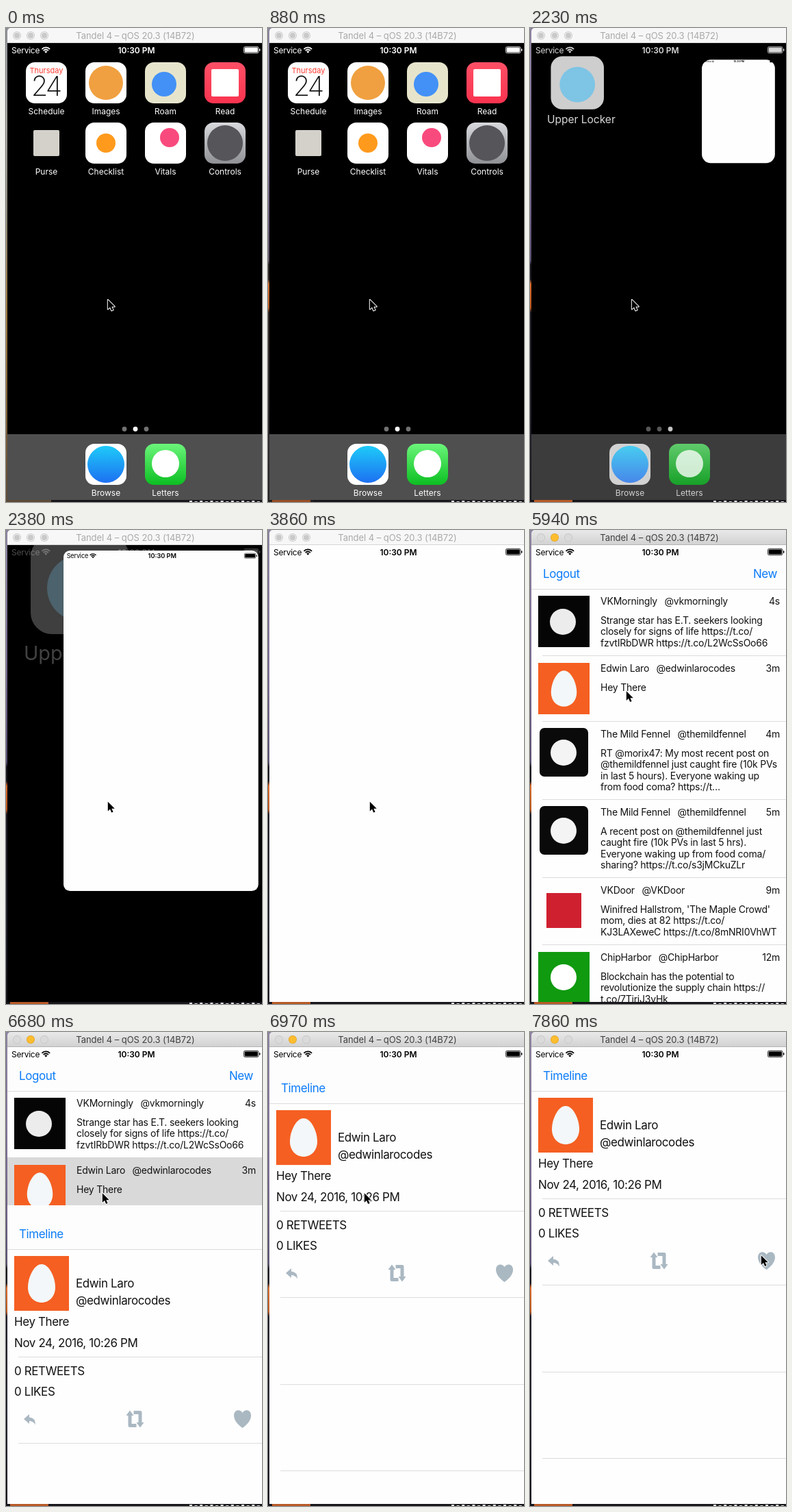
An HTML page with a canvas that plays this animation: 374 by 692 pixels, repeating every 8000 ms.

```html
<!DOCTYPE html>
<html lang="en">
<head>
<meta charset="utf-8">
<title>Phone simulator</title>
<style>
html, body { margin: 0; width: 374px; height: 692px; overflow: hidden; background: #000; }
canvas { display: block; }
</style>
</head>
<body>
<canvas id="stage" width="374" height="692"></canvas>
<script>
const ctx = document.getElementById('stage').getContext('2d');
const LOOP = 8000, STEP = 148.4;
const BLUE = '#0a7bf8', ICON = '#aab8c2', WHITE = '#fefefe';
const SCREEN = { x: 2, y: 22, w: 372, h: 667 };

const lerp = (a, b, p) => a + (b - a) * p;
const clamp = v => Math.max(0, Math.min(1, v));
const smooth = p => p * p * (3 - 2 * p);

function rect(x, y, w, h, color) {
  ctx.fillStyle = color;
  ctx.fillRect(x, y, w, h);
}

function round(x, y, w, h, r, color) {
  ctx.fillStyle = color;
  ctx.beginPath();
  ctx.roundRect(x, y, w, h, r);
  ctx.fill();
}

function dot(x, y, r, color) {
  ctx.fillStyle = color;
  ctx.beginPath();
  ctx.arc(x, y, r, 0, 7);
  ctx.fill();
}

function text(str, x, y, size, color, { align = 'left', weight = 400, gap = 0 } = {}) {
  ctx.font = `${weight} ${size}px Inter, "Open Sans", sans-serif`;
  ctx.letterSpacing = gap + 'px';
  ctx.textAlign = align;
  ctx.fillStyle = color;
  ctx.fillText(str, x, y);
  return ctx.measureText(str).width;
}

const big = (str, x, y, color = '#111', align) => text(str, x, y, 17, color, { gap: -0.4, align });
const small = (str, x, y, align) => text(str, x, y, 14, '#111', { gap: -0.22, align });

function fade(y0, y1, ...stops) {
  const g = ctx.createLinearGradient(0, y0, 0, y1);
  stops.forEach((s, i) => {
    const [at, color] = Array.isArray(s) ? s : [i / (stops.length - 1), s];
    g.addColorStop(at, color);
  });
  return g;
}

function clipScreen() {
  ctx.beginPath();
  ctx.rect(SCREEN.x, SCREEN.y, SCREEN.w, SCREEN.h);
  ctx.clip();
}

function fillScreen(color) {
  rect(SCREEN.x, SCREEN.y, SCREEN.w, SCREEN.h, color);
}

// Desktop visible beside and below the window
function desktop(p) {
  rect(0, 0, 374, 692, fade(0, 692, '#8c8f96', '#a5a49f', '#8d8878', '#a07a3c', '#806238', '#5c4a36'));
  ctx.globalAlpha = p;
  rect(0, 0, 374, 692, fade(0, 692, [0, '#8d83a0'], [0.3, '#77688f'], [0.49, '#584d6e'],
    [0.5, '#17161c'], [0.53, '#1a191f'], [0.54, '#d8692a'], [0.59, '#b8561f'], [0.6, '#1d1c26'], [0.8, '#20222e'], [1, '#14141a']));
  rect(6, 689, 56, 3, '#b75a26');
  ctx.globalAlpha = 1;
  rect(66, 689, 308, 3, '#17161b');
  for (let i = 0; i < 14; i++) rect(268 + i * 7.6, 690 + i % 2, 4, 2, '#ddd');
}

function titleBar(active) {
  ctx.fillStyle = active ? fade(0, 22, '#e9e9e9', '#d1d1d1') : '#f7f7f7';
  ctx.beginPath();
  ctx.roundRect(2, 0, 376, 22, [5, 0, 0, 0]);
  ctx.fill();
  rect(2, 21, 372, 1, active ? '#b4b4b4' : '#d6d6d6');
  [16, 36, 56].forEach((x, i) => {
    if (active) {
      dot(x, 11, 6, i === 1 ? '#dfa023' : '#c3c3c3');
      dot(x, 11, 5.3, i === 1 ? '#fdbd2f' : '#dadada');
    } else {
      dot(x, 11, 6, '#c4c4c4');
      dot(x, 11, 5.2, '#f0f0f0');
      dot(x, 11, 4, '#c9c9c9');
    }
  });
  text('Tandel 4 – qOS 20.3 (14B72)', 189, 16, 13, active ? '#3f3f3f' : '#a9a9a9', { align: 'center', gap: -0.05 });
}

function statusBar(x, y, k, color) {
  ctx.save();
  ctx.translate(x, y);
  ctx.scale(k, k);
  text('Service', 6, 14.5, 12, color, { gap: -0.25 });
  text('10:30 PM', 188.5, 14.5, 12, color, { align: 'center', weight: 600 });
  ctx.strokeStyle = color;
  ctx.lineWidth = 1.8;
  for (const r of [8, 4.9]) {
    ctx.beginPath();
    ctx.arc(56.3, 14.4, r, -Math.PI * 0.76, -Math.PI * 0.24);
    ctx.stroke();
  }
  ctx.fillStyle = color;
  ctx.beginPath();
  ctx.moveTo(56.3, 14.8);
  ctx.arc(56.3, 14.4, 2.8, -Math.PI * 0.76, -Math.PI * 0.24);
  ctx.fill();
  ctx.lineWidth = 0.8;
  ctx.beginPath();
  ctx.roundRect(345.4, 5.4, 21.6, 9.2, 2);
  ctx.stroke();
  round(346.6, 6.6, 19.2, 6.8, 1, color);
  round(368, 8.3, 1.4, 3.4, 0.7, color);
  ctx.restore();
}

function tile(x, y, color) {
  round(x, y, 60, 60, 13, color);
}

function label(str, x, y) {
  text(str, x, y, 12, '#fff', { align: 'center' });
}

// Each app: name, tile colour, then the plain mark: kind, dx, dy, half size, colour
function apps() {
  return [
    ['Schedule', '#fff'],
    ['Images', '#fff', 'c', 0, 0, 25, '#f0a040'],
    ['Roam', '#e6e5cc', 'c', -2, 2, 18, '#4391f6'],
    ['Read', fade(50, 110, '#ff4f66', '#f9334f'), 's', 0, 0, 20, '#fff'],
    ['Purse', null, 's', 0, 0, 19, '#d3d1ca'],
    ['Checklist', '#fff', 'c', 0, 0, 14, '#ff9a1c'],
    ['Vitals', '#fff', 'c', 6, -8, 14, '#f94a7d'],
    ['Controls', fade(138, 198, '#d8d9dc', '#8f9195'), 'c', 0, 0, 26, '#55555a'],
  ];
}

function mark(kind, x, y, r, color) {
  if (kind === 'c') dot(x, y, r, color);
  else round(x - r, y - r, 2 * r, 2 * r, 2, color);
}

function dock() {
  rect(2, 593, 372, 96, '#4f4f4f');
  tile(116, 607, '#fff');
  dot(146, 637, 27, fade(610, 664, '#1ecbf9', '#1d70f1'));
  tile(203, 607, fade(607, 667, '#6bf57a', '#0cbf22'));
  dot(233, 636, 20, '#fff');
  label('Browse', 146, 683);
  label('Letters', 233, 683);
}

function dots(active) {
  [173, 189, 205].forEach((x, i) => dot(x, 585.5, 3.4, i === active ? '#fff' : '#727272'));
}

function home() {
  fillScreen('#000');
  apps().forEach(([name, fill, kind, dx, dy, r, color], i) => {
    const x = 59 + (i % 4) * 87, y = 80 + (i >> 2) * 88;
    if (fill) tile(x - 30, y - 30, fill);
    if (kind) mark(kind, x + dx, y + dy, r, color);
    label(name, x, y + 46);
  });
  text('Thursday', 59, 66, 11, '#ff3b30', { align: 'center' });
  text('24', 58, 99, 40, '#111', { align: 'center', weight: 200, gap: -3 });
  dots(1);
  dock();
  statusBar(2, 22, 1, '#fff');
}

// The app window grows out of its icon while the home page zooms and darkens
function launch(p) {
  const q = p / 0.72, dim = Math.max(0, 1 - q * 0.74);
  const zoom = lerp(1, 2.4, q), k = lerp(60, SCREEN.w, p) / SCREEN.w;
  fillScreen('#000');
  ctx.save();
  clipScreen();
  ctx.globalAlpha = clamp(1 - q / 0.9);
  dots(2);
  dock();
  ctx.globalAlpha = dim;
  ctx.save();
  ctx.translate(lerp(59, 108, q), 80);
  ctx.scale(zoom, zoom);
  tile(-30, -30, '#f4f4f4');
  dot(0, 2, 20, '#6fc3ea');
  text('Upper Locker', -34.2, 46, 12, '#fff');
  ctx.restore();
  ctx.globalAlpha = Math.max(0.3, dim);
  statusBar(2, 22, 1, '#fff');
  ctx.globalAlpha = 1;
  const x = lerp(295, SCREEN.x, p), y = lerp(50.5, SCREEN.y, p);
  round(x, y, SCREEN.w * k, lerp(60, SCREEN.h, p), lerp(13, 0, p ** 4), WHITE);
  statusBar(x, y, k, '#000');
  ctx.restore();
}

function egg(x, y, size) {
  rect(x, y, size, size, '#f55f22');
  ctx.save();
  ctx.translate(x + size / 2, y + size / 2);
  ctx.scale(size / 80, size / 80);
  ctx.fillStyle = '#f3f7f9';
  ctx.beginPath();
  ctx.moveTo(0, -28);
  ctx.bezierCurveTo(11, -28, 20, -9, 20, 6);
  ctx.bezierCurveTo(20, 19, 11, 28, 0, 28);
  ctx.bezierCurveTo(-11, 28, -20, 19, -20, 6);
  ctx.bezierCurveTo(-20, -9, -11, -28, 0, -28);
  ctx.fill();
  ctx.restore();
}

function badge(y) {
  round(14, y - 1, 71, 71, 7, '#0a0a0a');
  dot(49, y + 35, 19, '#f4f4f4');
}

const posts = [
  { y: 87, name: 'VKMorningly', at: '@vkmorningly', age: '4s',
    body: ['Strange star has E.T. seekers looking', 'closely for signs of life https://t.co/', 'fzvtIRbDWR https://t.co/L2WcSsOo66'],
    face: y => { rect(12, y, 75, 75, '#050505'); dot(48, y + 38, 19, '#ececec'); } },
  { y: 185, name: 'Edwin Laro', at: '@edwinlarocodes', age: '3m', body: ['Hey There'],
    face: y => egg(12, y, 75) },
  { y: 281, name: 'The Mild Fennel', at: '@themildfennel', age: '4m',
    body: ['RT @morix47: My most recent post on', '@themildfennel just caught fire (10k PVs', 'in last 5 hours). Everyone waking up', 'from food coma? https://t…'],
    face: badge },
  { y: 395, name: 'The Mild Fennel', at: '@themildfennel', age: '5m',
    body: ['A recent post on @themildfennel just', 'caught fire (10k PVs in last 5 hrs).', 'Everyone waking up from food coma/', 'sharing? https://t.co/s3jMCkuZLr'],
    face: badge },
  { y: 509, name: 'VKDoor', at: '@VKDoor', age: '9m',
    body: ["Winifred Hallstrom, 'The Maple Crowd'", 'mom, dies at 82 https://t.co/', 'KJ3LAXeweC https://t.co/8mNRI0VhWT'],
    face: y => rect(24, y + 12, 51, 51, '#cf2030') },
  { y: 607, name: 'ChipHarbor', at: '@ChipHarbor', age: '12m',
    body: ['Blockchain has the potential to', 'revolutionize the supply chain https://', 't.co/7TiriJ3yHk'],
    face: y => { rect(12, y, 75, 75, '#0f9a0f'); dot(49, y + 37, 19, '#fff'); } },
];

const rule = (y, x = 18) => rect(x, y, 374 - x, 1, '#dcdcdc');

function navBar(left, right) {
  rect(2, 22, 372, 64, '#fdfdfd');
  rule(86, 2);
  big(left, 19, 70, BLUE);
  if (right) big(right, 361, 70, BLUE, 'right');
}

function feed(filled, picked) {
  fillScreen(WHITE);
  navBar('Logout', 'New');
  if (!filled) {
    for (let y = 130; y < 689; y += 44) rule(y);
    return;
  }
  posts.forEach(({ y, name, at, age, body, face }, i) => {
    if (i) rule(y - 2);
    if (picked && i === 1) rect(2, y - 2, 372, 96, '#d9d9d9');
    face(y + 9);
    const w = small(name, 103, y + 22);
    small(at, 103 + w + 10.5, y + 22);
    small(age, 365, y + 22, 'right');
    body.forEach((line, n) => small(line, 103, y + 49.5 + n * 16.6));
  });
}

function replyIcon() {
  ctx.fillStyle = ICON;
  ctx.beginPath();
  ctx.moveTo(26, 334);
  ctx.lineTo(34, 327);
  ctx.lineTo(34, 331.5);
  ctx.quadraticCurveTo(43, 332, 43, 342.5);
  ctx.quadraticCurveTo(40, 337, 34, 337);
  ctx.lineTo(34, 341);
  ctx.closePath();
  ctx.fill();
}

function repeatIcon() {
  ctx.fillStyle = ctx.strokeStyle = ICON;
  ctx.lineWidth = 5;
  ctx.lineJoin = 'round';
  for (const turn of [0, Math.PI]) {
    ctx.save();
    ctx.translate(188.5, 334);
    ctx.rotate(turn);
    ctx.fill(new Path2D('M-13 -5L-7.5 -12.5L-2 -5Z'));
    ctx.stroke(new Path2D('M-7.5 -6V9.5H2'));
    ctx.restore();
  }
}

function heartIcon() {
  ctx.fillStyle = ICON;
  ctx.beginPath();
  ctx.moveTo(345.5, 325);
  ctx.bezierCurveTo(348, 319.5, 358, 319.5, 358, 329);
  ctx.bezierCurveTo(358, 337, 350, 344, 345.5, 347);
  ctx.bezierCurveTo(341, 344, 333, 337, 333, 329);
  ctx.bezierCurveTo(333, 319.5, 343, 319.5, 345.5, 325);
  ctx.fill();
}

function detail(offset) {
  ctx.save();
  ctx.translate(0, offset);
  fillScreen(WHITE);
  navBar('Timeline');
  egg(12, 96, 80);
  big('Edwin Laro', 102, 142);
  big('@edwinlarocodes', 102, 167);
  big('Hey There', 12, 198);
  big('Nov 24, 2016, 10:26 PM', 12, 228.5);
  big('0 RETWEETS', 12, 269.5);
  big('0 LIKES', 12, 300);
  [243, 369, 496, 622].forEach(y => rule(y));
  replyIcon();
  repeatIcon();
  heartIcon();
  ctx.restore();
}

function pointer([x, y]) {
  const shape = new Path2D('M.8 .8V14.6L4 11.6L6.2 16.6L8.6 15.6L6.4 10.7H10.8Z');
  ctx.save();
  ctx.translate(x, y);
  ctx.lineJoin = 'round';
  ctx.lineWidth = 2;
  ctx.strokeStyle = '#fff';
  ctx.stroke(shape);
  ctx.fillStyle = '#000';
  ctx.fill(shape);
  ctx.restore();
}

function pointerAt(k) {
  if (k < 32) return [148, 396];
  if (k < 47) {
    const p = clamp((k - 32) / 8), e = 1 - (1 - p) ** 2;
    return [lerp(149, 140, e), lerp(357, 234.5, e)];
  }
  if (k > 52) return [337, 325.5];
  const e = smooth((k - 47) / 5);
  return [lerp(140, 331, e), lerp(234.5, 316, e)];
}

function draw(t) {
  // The screen advances in even steps
  const k = Math.min(53, Math.floor((t + 8) / STEP));
  desktop(smooth(clamp(k / 7)));
  titleBar(k >= 27);
  if (k < 15) home();
  else if (k < 18) launch([0.15, 0.72, 0.96][k - 15]);
  else {
    ctx.save();
    clipScreen();
    if (k < 28) fillScreen(WHITE);
    else feed(k > 28, k >= 45);
    if (k >= 45) detail(k > 48 ? 0 : 231 * 0.28 ** (k - 45));
    statusBar(2, 22, 1, '#000');
    ctx.restore();
  }
  pointer(pointerAt(k));
}

const start = performance.now();
function tick(now) {
  draw(Math.max(0, now - start) % LOOP);
  requestAnimationFrame(tick);
}
draw(0);
requestAnimationFrame(tick);
</script>
</body>
</html>
```
